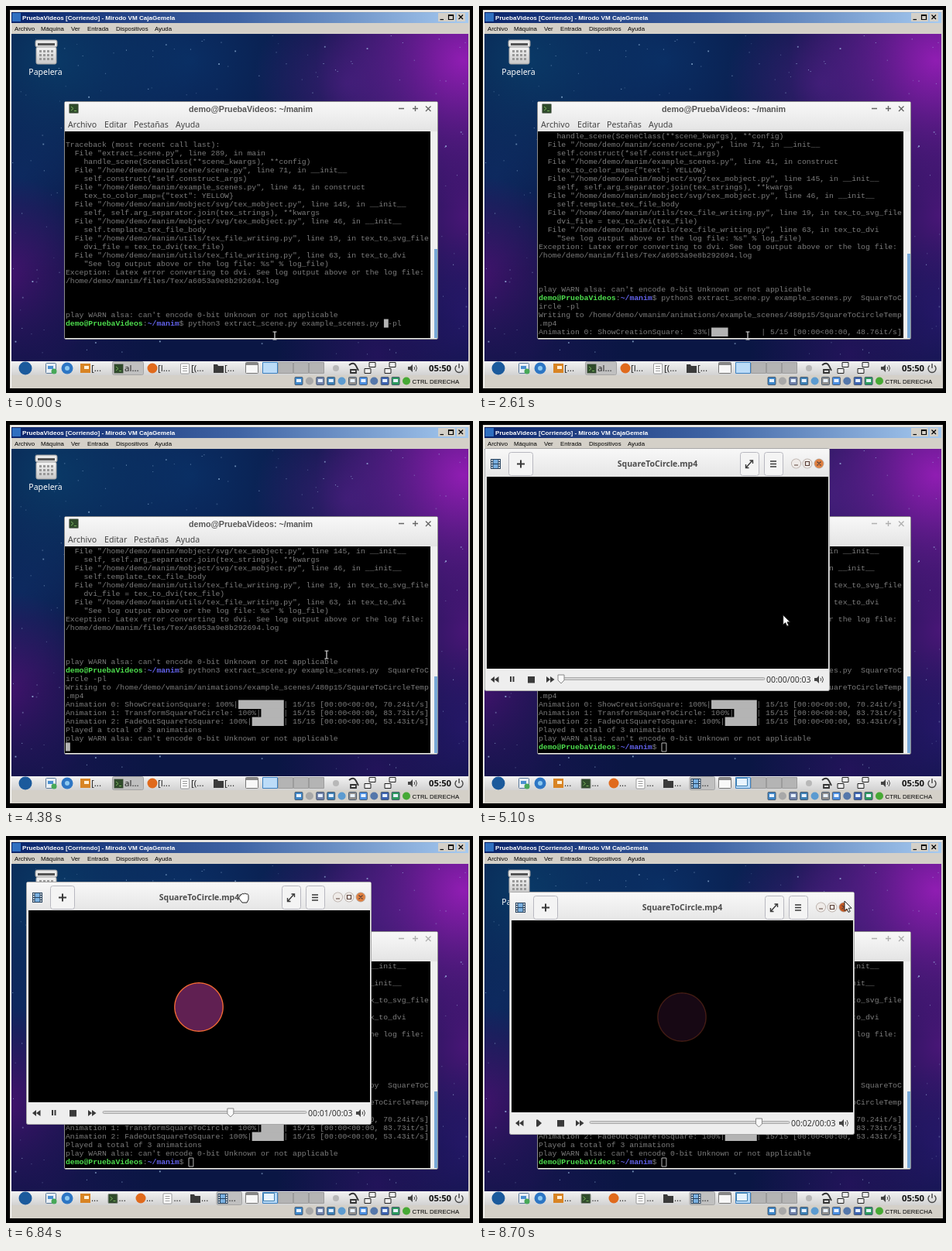
An HTML page with a canvas that plays this animation: 603x500 px, repeating every 8910 ms.

```html
<!DOCTYPE html>
<html lang="es">
<head>
<meta charset="utf-8">
<style>
html, body { margin: 0; width: 100%; height: 100%; overflow: hidden; background: #000; }
canvas { display: block; }
</style>
</head>
<body>
<canvas id="stage" width="603" height="500"></canvas>
<script>
const ctx = document.getElementById('stage').getContext('2d');
const LOOP = 8910, COL = 5.87, ROW = 11, ROWS = 24;
const UI = '"Noto Sans", sans-serif', ARIAL = '"Liberation Sans", Arial, sans-serif';
const MONO = '9.78px "Liberation Mono", monospace';
const OPEN = 4800, DRAG = 6390, DROP = 7130, PAUSE = 7640;

// ---- helpers ----
function rect(color, x, y, w, h) { ctx.fillStyle = color; ctx.fillRect(x, y, w, h); }
function text(s, x, y, font, color, align = 'left') {
  ctx.font = font; ctx.fillStyle = color; ctx.textAlign = align;
  ctx.fillText(s, x, y);
}
function disc(color, x, y, r) {
  ctx.fillStyle = color; ctx.beginPath(); ctx.arc(x, y, r, 0, 7); ctx.fill();
}
function shape(d, x, y, fill, stroke, width = 1) {
  const p = new Path2D(d);
  ctx.save(); ctx.translate(x, y);
  if (fill) { ctx.fillStyle = fill; ctx.fill(p); }
  if (stroke) { ctx.strokeStyle = stroke; ctx.lineWidth = width; ctx.stroke(p); }
  ctx.restore();
}
function box(x, y, w, h, r, fill, stroke) {
  ctx.beginPath(); ctx.roundRect(x, y, w, h, r);
  if (fill) { ctx.fillStyle = fill; ctx.fill(); }
  if (stroke) { ctx.strokeStyle = stroke; ctx.lineWidth = 1; ctx.stroke(); }
}
function linear(x0, y0, x1, y1, ...colors) {
  const g = ctx.createLinearGradient(x0, y0, x1, y1);
  colors.forEach((c, i) => g.addColorStop(i / (colors.length - 1), c));
  return g;
}
// Piecewise linear value through [time, value] keys
function keyed(t, keys) {
  if (t <= keys[0][0]) return keys[0][1];
  for (let i = 1; i < keys.length; i++) {
    const [a, va] = keys[i - 1], [b, vb] = keys[i];
    if (t < b) return va + (vb - va) * (t - a) / (b - a);
  }
  return keys.at(-1)[1];
}
const clamp = v => Math.min(1, Math.max(0, v));
const smooth = v => { v = clamp(v); return v * v * (3 - 2 * v); };
const mix = (a, b, k) => a + (b - a) * k;

// ---- desktop ----
const GLOWS = [
  [60, 70, 190, '10,72,116,.7'], [240, 70, 190, '10,62,120,.6'], [20, 220, 130, '16,52,112,.55'],
  [0, 350, 130, '92,18,128,.7'], [60, 450, 130, '30,20,84,.6'], [590, 70, 190, '158,30,190,.9'],
  [440, 100, 120, '84,34,140,.6'], [600, 270, 140, '96,22,138,.75'], [600, 400, 110, '46,24,118,.7'],
  [480, 450, 130, '50,18,104,.6']
];
function random(seed) {
  return () => (seed = (seed * 16807) % 2147483647) / 2147483647;
}
function wallpaper() {
  rect('#0a1644', 7, 36, 590, 423);
  for (const [x, y, r, rgba] of GLOWS) {
    const g = ctx.createRadialGradient(x, y, 0, x, y, r);
    g.addColorStop(0, `rgba(${rgba})`);
    g.addColorStop(1, `rgba(${rgba.replace(/[^,]+$/, '0')})`);
    rect(g, 7, 36, 590, 423);
  }
  const rnd = random(41);
  for (let i = 0; i < 260; i++) {
    const x = 8 + rnd() * 587, y = 37 + rnd() * 420, s = rnd() < .12 ? 1.8 : 1;
    rect(`rgba(170,205,240,${.2 + rnd() * .6})`, x, y, s, s);
  }
  // Trash can
  box(38, 44, 28, 9, 2, '#e8e8e8', '#9a9a9a');
  rect('#555', 41, 48, 22, 3);
  box(39, 53, 26, 22, 2, linear(0, 53, 0, 75, '#f4f4f4', '#c8c8c8'), '#a4a4a4');
  for (let i = 0; i < 12; i++) rect('#999', 43 + i % 4 * 5, 57 + (i >> 2) * 5, 3, 3);
  text('Papelera', 51, 89, '10.5px ' + UI, '#fff', 'center');
}

function hostWindow() {
  rect('#000', 0, 0, 603, 500);
  rect('#d4d0c8', 5, 5, 594, 489);
  rect('#fff', 6, 6, 592, 1);
  rect('#fff', 6, 6, 1, 487);
  rect(linear(6, 0, 596, 0, '#0a246a', '#3f64a4', '#a6caf0'), 7, 8, 590, 14);
  rect('#2f6fc0', 8, 9, 11, 11);
  text('PruebaVideos [Corriendo] - Mirodo VM CajaGemela', 21, 18, 'bold 8.1px ' + ARIAL, '#fff');
  [558, 569, 582].forEach((x, i) => {
    rect('#d4d0c8', x, 9, 11, 11);
    shape(['M2.5 8.5H7', 'M2.5 2.5H8.5V8.5H2.5Z M2.5 3.5H8.5', 'M2.5 2.5L8 8M8 2.5L2.5 8'][i], x, 9, null, '#000', 1.2);
  });
  [['Archivo', 11], ['Máquina', 45], ['Ver', 84], ['Entrada', 105], ['Dispositivos', 142], ['Ayuda', 192]]
    .forEach(([s, x]) => text(s, x, 32, '7.8px ' + ARIAL, '#000'));
  const tints = ['#3d86c8', '#a8a8a8', '#6d7fa8', '#3c7fb4', '#5c9bd0', '#8d8d8d', '#4a8de0', '#5577aa', '#3c62b0', '#2a9a5c', '#47a934'];
  tints.forEach((c, i) => {
    const x = 373 + i * 13.9;
    if (i % 3 == 1) disc(c, x + 5, 484.5, 5);
    else { box(x, 479.5, 10, 10, 1, c, '#4b5c70'); rect('#e8f2ff', x + 2, 482, 6, 4); }
  });
  text('CTRL DERECHA', 524.5, 488, '7.8px ' + ARIAL, '#000');
}

// ---- taskbar ----
function filmIcon(x, y) {
  rect('#24405c', x, y, 13, 13);
  rect('#7ab0e0', x + 3.5, y + 1, 6, 5);
  rect('#7ab0e0', x + 3.5, y + 7, 6, 5);
  for (let i = 0; i < 4; i++) { rect('#eee', x + 1, y + 1 + i * 3, 1.5, 2); rect('#eee', x + 10.5, y + 1 + i * 3, 1.5, 2); }
}
function terminalIcon(x, y) {
  box(x + .5, y + .5, 12, 12, 1, '#2f4a2b', '#8a8f88');
  shape('M3 4L6 6.5L3 9M7 9.5H10', x, y, null, '#78b45c');
}
function speaker(x, y) {
  shape('M-6 -2H-3L0 -5V5L-3 2H-6Z', x, y, '#444');
  shape('M2 -2Q3.5 0 2 2M4 -4Q7 0 4 4', x, y, null, '#444');
}
function taskbar(playerOpen) {
  rect(linear(0, 458, 0, 477, '#f4f4f4', '#d2d2d2'), 7, 459, 590, 18);
  disc('#1b5a9c', 25, 468, 8.5);
  box(51.5, 461.5, 13, 13, 1, '#e8eef4', '#58789a');
  rect('#4a90d0', 54, 465, 7, 4);
  disc('#47a858', 62, 472, 3.5);
  disc('#2d76c4', 79, 468, 7.5);
  disc('#8cc8f0', 79, 468, 3);
  const labels = playerOpen ? Array(6).fill('...') : ['[...', 'al...', '[l...', '[(...', '[...'];
  const pitch = playerOpen ? 35.5 : 43;
  labels.forEach((s, i) => {
    const x = 94 + i * pitch;
    if (i == (playerOpen ? 5 : 1)) box(x + .5, 459.5, pitch - 3, 17, 2, '#c0c0c0', '#a4a4a4');
    const ix = x + 2, iy = 462;
    if (i == 0) { rect('#d88424', ix, iy, 13, 12); rect('#fff0d8', ix + 5, iy + 3, 6, 4); }
    if (i == 1) terminalIcon(ix, iy);
    if (i == 2) disc('#e06a1c', ix + 7, 468, 6.5);
    if (i == 3) { box(ix + .5, iy, 11, 13, 1, '#fff', '#999'); for (let k = 0; k < 3; k++) rect('#999', ix + 3, iy + 3 + k * 3, 6, 1); }
    if (i == 4) shape('M0 2H5L6 4H13V13H0Z', ix, iy - 1, '#3a3a3a');
    if (i == 5) filmIcon(ix, iy);
    text(s, x + 16, 472, '11.5px ' + UI, '#222');
  });
  box(309.5, 460.5, 16, 14, 1, '#f8f8f8', '#777');
  rect('#888', 310, 461, 15, 3);
  for (let i = 0; i < 4; i++) box(331.5 + i * 20, 460.5, 19, 14, 0, i ? '#b4b4b4' : '#bcdcf8', i ? '#9c9c9c' : '#3a80c0');
  if (playerOpen) box(332.5, 461.5, 14, 10, 0, '#e8f4ff', '#4080b0');
  disc('#b8b8b8', 426, 468, 4);
  shape('M-6 -3Q0 -8 3 -2T6 4M-4 3H3V7H-4Z', 449, 467, null, '#333', 1.8);
  for (const x of [470, 496]) {
    box(x - 1, 460.5, 8, 6, 0, '#eee', '#222');
    box(x - 7, 468.5, 8, 6, 0, '#eee', '#222');
  }
  speaker(525, 468);
  text('05:50', 546, 472, '600 11.3px ' + UI, '#111');
  shape('M-3 -3.5A5 5 0 1 0 3 -3.5M0 -6V0', 585, 468, null, '#444', 1.4);
}

// ---- terminal ----
const USER = 'demo@PruebaVideos', PROMPT = USER + ':~/manim$ ';
const COMMAND = PROMPT + 'python3 extract_scene.py example_scenes.py ';
const WARN = "play WARN alsa: can't encode 0-bit Unknown or not applicable";
const file = (path, line, fn) => `  File "${path}", line ${line}, in ${fn}`;
const HOME = '/home/demo/manim/';
const LOG = [
  '', 'Traceback (most recent call last):',
  file('extract_scene.py', 289, 'main'),
  '    handle_scene(SceneClass(**scene_kwargs), **config)',
  file(HOME + 'scene/scene.py', 71, '__init__'),
  '    self.construct(*self.construct_args)',
  file(HOME + 'example_scenes.py', 41, 'construct'),
  '    tex_to_color_map={"text": YELLOW}',
  file(HOME + 'mobject/svg/tex_mobject.py', 145, '__init__'),
  '    self, self.arg_separator.join(tex_strings), **kwargs',
  file(HOME + 'mobject/svg/tex_mobject.py', 46, '__init__'),
  '    self.template_tex_file_body',
  file(HOME + 'utils/tex_file_writing.py', 19, 'tex_to_svg_file'),
  '    dvi_file = tex_to_dvi(tex_file)',
  file(HOME + 'utils/tex_file_writing.py', 63, 'tex_to_dvi'),
  '    "See log output above or the log file: %s" % log_file)',
  'Exception: Latex error converting to dvi. See log output above or the log file:',
  HOME + 'files/Tex/a6053a9e8b292694.log', '', '', '', WARN
];
const BARS = [
  ['ShowCreationSquare', [[2400, 0], [2600, 5], [2700, 5.9], [3000, 15]], 70.24],
  ['TransformSquareToCircle', [[3090, 0], [3480, 15]], 83.73],
  ['FadeOutSquareToSquare', [[3660, 0], [4020, 15]], 53.43]
];
function progress(t, i) {
  const [name, keys, speed] = BARS[i], n = Math.floor(keyed(t, keys));
  const rate = mix(48.76, speed, (n - 5) / 10).toFixed(2);
  const head = `Animation ${i}: ${name}: ${String(Math.floor(n / 15 * 100)).padStart(3)}%|`;
  const tail = `| ${n}/15 [00:00<00:00, ${rate}it/s]`;
  const room = 80 - head.length - tail.length;
  return { line: head + ' '.repeat(room) + tail, start: head.length, fill: room * n / 15 };
}
function terminalRows(t) {
  const rows = LOG.map(line => ({ line }));
  const add = line => rows.push({ line });
  if (t < 1140) { add(COMMAND + ' -pl'); return rows; }
  const full = COMMAND + ' SquareToCircle -pl';
  add(full.slice(0, 80));
  add(full.slice(80));
  if (t < 1980) return rows;
  if (t >= 2190) {
    add('Writing to /home/demo/vmanim/animations/example_scenes/480p15/SquareToCircleTemp');
    add('.mp4');
  }
  BARS.forEach((b, i) => { if (t >= b[1][0][0]) rows.push(progress(t, i)); });
  if (t >= 4080) add('Played a total of 3 animations');
  if (t >= 4200) add(WARN);
  if (t < 2400 || t >= 4080) add(t >= 4650 ? PROMPT : '');
  return rows;
}
function terminal(t, focused) {
  box(75.5, 123.5, 482, 307, 2, '#f0f0f0', '#8c8c8c');
  rect(linear(0, 124, 0, 162, '#f8f8f8', '#e4e4e4'), 76, 124, 481, 38);
  terminalIcon(81, 126);
  text(USER + ': ~/manim', 316, 136.5, 'bold 10.7px ' + ARIAL, focused ? '#555' : '#aaa', 'center');
  const tone = focused ? '#666' : '#b0b0b0';
  shape('M507 132.5H514M525 132.5H532M528.5 129V136M542 129.5L548.5 136M548.5 129.5L542 136', 0, 0, null, tone, 1.4);
  [['Archivo', 80], ['Editar', 127], ['Pestañas', 165], ['Ayuda', 219]]
    .forEach(([s, x]) => text(s, x, 157, '10.6px ' + UI, '#444'));
  rect('#000', 76, 162, 472, 267);

  const rows = terminalRows(t), scroll = Math.max(0, rows.length - ROWS);
  rect('#78a8d8', 553, 314 + scroll * 2, 4, 115 - scroll * 2);
  rows.slice(scroll).forEach(({ line, start, fill }, r) => {
    const y = 171 + r * ROW;
    if (line.startsWith(PROMPT)) {
      text(USER, 77, y, 'bold ' + MONO, '#4ee04e');
      text('~/manim', 77 + COL * 18, y, 'bold ' + MONO, '#6464f0');
      line = ' '.repeat(17) + ':' + ' '.repeat(7) + line.slice(25);
    }
    text(line, 77, y, MONO, '#7c7c7c');
    if (fill) rect('#b4b4b4', 77 + start * COL, y - 8.5, fill * COL, ROW + .5);
  });

  const last = rows.length - 1 - scroll;
  let col = rows.at(-1).line.length;
  if (t < 1140) col = 70;
  else if (t < 1980) col = 5;
  const cx = 77 + col * COL, cy = 162.5 + last * ROW;
  if (!focused) box(cx + .5, cy + .5, COL, ROW, 0, null, '#b4b4b4');
  else if (col < 80) rect('#b4b4b4', cx, cy, COL, ROW);
}

// ---- video player ----
const videoTime = t => keyed(t, [[5130, 0], [6030, .92], [6840, 1.88], [7230, 2.13], [PAUSE, 2.54]]);

function morph(v) {
  const k = smooth((v - 1) / .8), drawn = smooth(v / .85), N = 80;
  ctx.beginPath();
  for (let i = 0; i <= N * drawn; i++) {
    const a = i / N * 2 * Math.PI, c = Math.cos(a), s = Math.sin(a);
    const r = mix(44 / (Math.abs(c) + Math.abs(s)), 31.2, k);
    ctx.lineTo(230 + r * c, 197 + r * s);
  }
  if (drawn == 1) ctx.closePath();
  ctx.save();
  ctx.globalAlpha = keyed(v, [[2.13, 1], [2.54, .24]]);
  ctx.fillStyle = `rgba(209,71,180,${.46 * k})`;
  if (k) ctx.fill();
  ctx.strokeStyle = `rgb(${mix(255, 240, k)},${mix(255, 104, k)},${mix(255, 52, k)})`;
  ctx.lineWidth = 1.4;
  if (drawn) ctx.stroke();
  ctx.restore();
}
function player(t, dx, dy) {
  const v = videoTime(t), paused = t >= PAUSE, shift = paused ? 6 : 0, ink = '#3a3a3a';
  ctx.save();
  ctx.translate(dx, dy);
  box(7.5, 35.5, 445, 313, 2, '#eeeeee', '#a8a8a8');
  rect(linear(0, 36, 0, 72, '#f8f8f8', '#e6e6e6'), 8, 36, 444, 36);
  filmIcon(15, 49);
  for (const [x, w] of [[38, 31], [337, 24], [368, 24]]) box(x + .5, 40.5, w, 30, 3, '#f4f4f4', '#b8b8c0');
  shape('M49 55.5H59M54 50.5V60.5', 0, 0, null, ink, 2);
  shape('M345 60L353 51M349.5 51H353.5V55M344.5 56V60.5H348.5', 0, 0, null, ink, 1.4);
  shape('M376 52H384M376 55.5H384M376 59H384', 0, 0, null, ink, 1.5);
  text('SquareToCircle.mp4', 230.5, 59, 'bold 10.5px ' + UI, '#4c4c4c', 'center');
  [409.5, 424, 439].forEach((x, i) => {
    disc('#b8aea8', x, 55, 6.5);
    disc(i < 2 ? '#efebe8' : t > 8560 ? '#c45a24' : '#e08040', x, 55, 5.7);
  });
  shape('M407 57H412M421.5 52.5H426.5V57.5H421.5Z M436.5 52.5L441.5 57.5M441.5 52.5L436.5 57.5', 0, 0, null, '#5a4038', 1.2);
  rect('#000', 10, 72, 441, 248);
  morph(v);

  shape('M20 330V338L15 334ZM25.5 330V338L20 334Z', 0, 0, ink);
  if (paused) shape('M42 329.5H44L49 334L44 338.5H42Z', 0, 0, ink);
  else { rect(ink, 40, 330, 2, 7); rect(ink, 43.5, 330, 2, 7); }
  rect(ink, 63 + shift, 330, 9, 8.5);
  shape('M87 330V338L92 334ZM92 330V338L97.5 334Z', shift, 0, ink);
  const left = 106 + (paused ? 5 : 0), knob = mix(left, 369, v / 3);
  box(left, 331.5, 369 - left, 3, 1.5, '#d4d4d4', '#aaa');
  shape('M-4 -5H4V2L0 6L-4 2Z', knob, 333, '#fafafa', '#888');
  text(`00:0${Math.floor(v)}/00:03`, 371, 338, '10.5px ' + UI, '#333');
  speaker(439, 334);
  ctx.restore();
}

// ---- pointer ----
const POINTER_X = [[3660, 347], [4300, 414], [4600, 414], [5400, 380], [5950, 282], [DRAG, 282], [6840, 301], [DROP, 314],
  [7230, 321], [7290, 321], [8100, 511], [8190, 511], [8420, 440], [8600, 472]];
const POINTER_Y = [[3660, 426], [4300, 302], [4600, 302], [5400, 220], [5950, 50], [DRAG, 50], [6840, 74], [DROP, 87],
  [7230, 105], [7290, 106], [8100, 124], [8190, 124], [8420, 92], [8600, 84]];
function pointer(t) {
  const x = keyed(t, POINTER_X), y = keyed(t, POINTER_Y);
  if (t < OPEN) shape('M-2.5 -5H-.5L0 -4.5L.5 -5H2.5M0 -4.5V4.5M-2.5 5H-.5L0 4.5L.5 5H2.5', x, y, null, '#ddd', 1.2);
  else if (t >= DRAG && t < DROP) shape('M1 4Q0 1 3 2Q4 -1 6 1Q8 -1 9 1Q12 0 12 4V8L10 12H4L0 7Q-1 5 1 4Z', x, y, '#fff', '#222');
  else shape('M0 0V12.5L3 10L5 14.5L7.2 13.5L5.2 9.2H9Z', x, y, '#fff', '#222');
}

function draw(t) {
  const open = t >= OPEN;
  hostWindow();
  wallpaper();
  taskbar(open);
  terminal(t, !open);
  if (open) {
    const dx = keyed(t, [[DRAG, 0], [6840, 19], [DROP, 32]]);
    const dy = keyed(t, [[DRAG, 0], [6840, 24], [DROP, 37]]);
    player(t, Math.round(dx), Math.round(dy));
  }
  pointer(t);
}
function tick() {
  draw(performance.now() % LOOP);
  requestAnimationFrame(tick);
}
tick();
</script>
</body>
</html>
```
